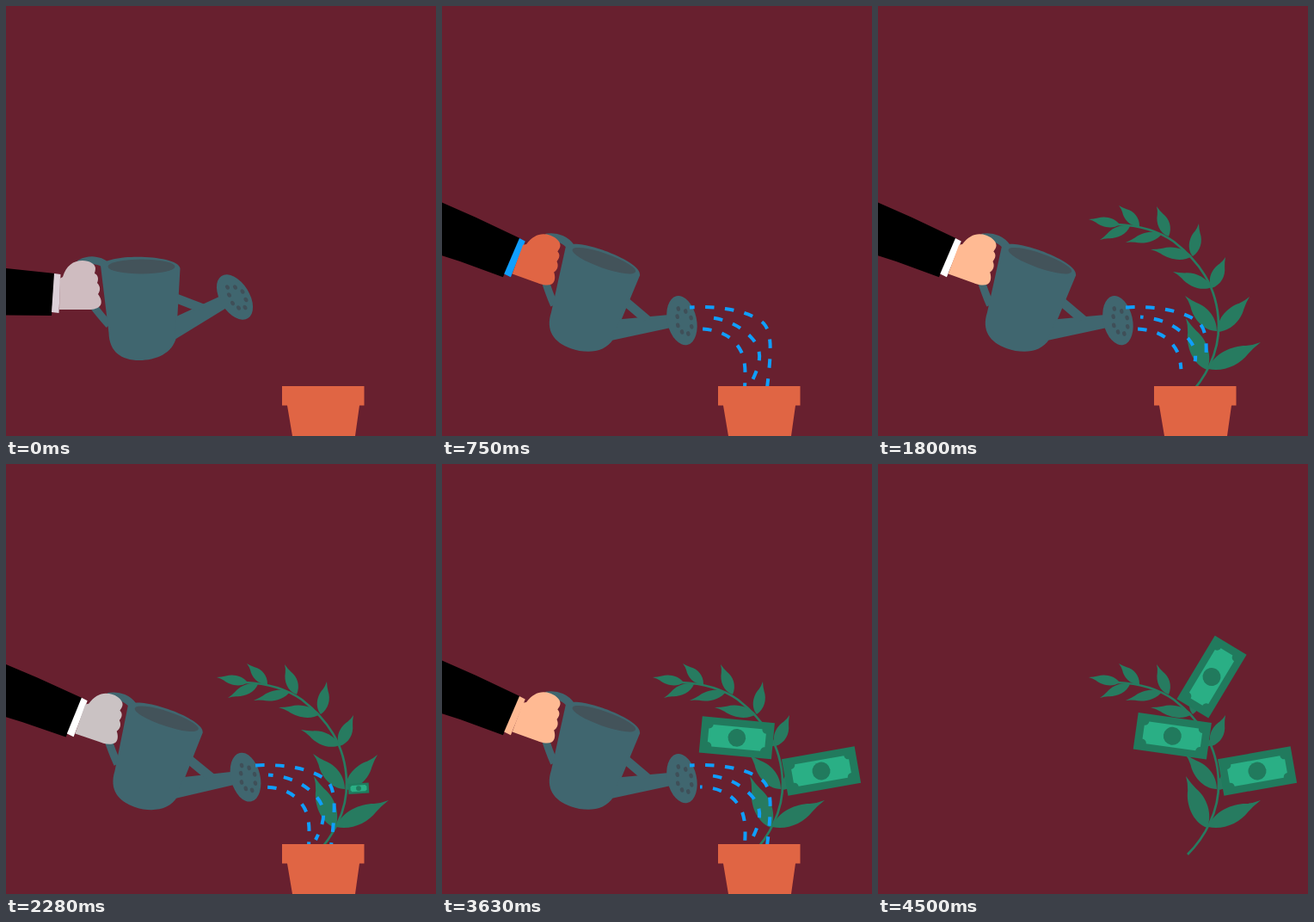
An HTML page that plays this animation: 500x500 px, repeating every 4.53 s.

```html
<!DOCTYPE html>
<html lang="en">
<head>
<meta charset="utf-8">
<title>Watering the money plant</title>
<style>
  html, body { margin: 0; width: 100%; height: 100%; overflow: hidden; background: #68202f; }
  svg { display: block; width: 100%; height: 100%; }
</style>
</head>
<body>
<svg viewBox="0 0 500 500">
  <defs>
    <g id="bill">
      <rect x="-43" y="-21.5" width="86" height="43" fill="#217a5d"/>
      <path fill="#2aaf85" d="M-29-13H29A5 5 0 0 0 34-8V8A5 5 0 0 0 29 13H-29A5 5 0 0 0-34 8V-8A5 5 0 0 0-29-13Z"/>
      <circle r="10.5" fill="#217a5d"/>
    </g>
  </defs>
  <rect width="500" height="500" fill="#68202f"/>
  <g id="plant" fill="#277b60">
    <path d="M360 454C379 435 397 405 396 370C395 325 372 296 344 274C324 260 302 255 278 254" fill="none" stroke="#277b60" stroke-width="2.7"/>
  </g>
  <g id="bills"></g>
  <g id="props">
    <g id="can">
      <path d="M116 301C108 295 97 294 87 299C82 320 90 338 120 371" fill="none" stroke="#40666f" stroke-width="9"/>
      <g fill="#40666f">
        <path d="M110 302C118 287 200 289 202.5 305L198 385C194 404 174 412 155 412C134 412 120 402 119.5 380Z"/>
        <path d="M198 361L250 337L258 350L196 388Z"/>
        <path d="M200 335L234 348L222 355L199 346Z"/>
        <ellipse cx="266" cy="338.5" rx="17" ry="29" transform="rotate(-32 266 338.5)"/>
      </g>
      <ellipse cx="157.5" cy="303" rx="39" ry="8.5" fill="#43535a"/>
      <g id="holes" fill="#3f4f58"></g>
      <path d="M-90 298L0 305L57 311L53 360L0 359.5L-90 362Z"/>
      <path id="cuff" d="M56 311L63.500 312L61.500 357L53 356Z"/>
      <path id="hand" d="M62.500 317L66 315C70 302 78 296 89 296C97 296 104 300 104 305C104 308 103 310 103 311C107 313 108 317 106 322C110 326 110 331 107 335C111 340 112 346 109 349C104 354 95 353 90 353L62 353Z"/>
    </g>
    <g id="water" fill="none" stroke="#0f9fff" stroke-width="4">
      <path d="M288 350.500C330 348 361 357 374 369C384 380 383 402 378 444"/>
      <path d="M305 361.500C327 363 346 370 361 387C373 401 371 415 360 437"/>
      <path d="M300 375.500C327 376 341 388 348 402C353 414 353 425 352 444"/>
    </g>
    <path d="M321 442H416.500V464.500H411L406 500H333L327 464.500H321Z" fill="#e06544"/>
  </g>
</svg>
<script>
const LOOP = 4530, CURTAIN = 4500, TILT = 19.4;
const DASH = 10.5, PERIOD = 23, FLOW = 0.1;
const $ = id => document.getElementById(id);

function add(parent, tag, attrs) {
  const el = document.createElementNS('http://www.w3.org/2000/svg', tag);
  for (const k in attrs) el.setAttribute(k, attrs[k]);
  return parent.appendChild(el);
}

// base x, base y, tip x, tip y, width
const leaves = [
  [383, 423, 358, 363, 20], [384, 422, 445, 391, 19], [394, 378, 357, 337, 17],
  [395, 379, 432, 338, 17], [388, 327, 343, 309, 14], [388, 328, 404, 292, 14],
  [365, 291, 317, 283, 13], [366, 291, 373, 253, 13], [330, 265, 288, 275, 11],
  [338, 268, 324, 233, 13], [293, 256, 258, 272, 11], [304, 256, 280, 232, 12],
  [281, 254, 245, 248, 11]
];
for (const [x, y, tx, ty, w] of leaves) {
  const n = Math.hypot(tx - x, ty - y);
  const p = (a, b) => `${(a * n).toFixed(1)} ${(b * w).toFixed(1)}`;
  add($('plant'), 'path', {
    d: `M0 0C${p(.2, -.7)} ${p(.55, -.6)} ${p(.75, -.22)}Q${p(.87, -.04)} ${p(1, 0)}` +
       `Q${p(.85, .1)} ${p(.72, .28)}C${p(.5, .65)} ${p(.2, .6)} 0 0Z`,
    transform: `translate(${x} ${y}) rotate(${Math.atan2(ty - y, tx - x) * 180 / Math.PI})`
  });
}

const holes = [[257.5, 327], [266.5, 327], [275, 332], [279, 341.5], [278, 350.5],
  [270.5, 351], [263.5, 345.5], [259.5, 336]];
for (const [x, y] of holes)
  add($('holes'), 'ellipse', { cx: x, cy: y, rx: 2.2, ry: 2.9, transform: `rotate(-32 ${x} ${y})` });

const bills = [
  { at: 2250, px: 397, py: 383, cx: 441, cy: 357, rot: -10, swing: 8 },
  { at: 3170, px: 386, py: 322, cx: 342.3, cy: 316.3, rot: 8, swing: -30 },
  { at: 3840, px: 366, py: 286, cx: 388, cy: 247.5, rot: -59, swing: 20 }
];
for (const b of bills) b.el = add($('bills'), 'use', { href: '#bill' });

// tilt: start, fully tipped, start back, upright; dash phases per stream at time ref
const pours = [
  { tilt: [0, 350, 1050, 1400], ref: 750, phase: [18, 11, 3] },
  { tilt: [1420, 1700, 2215, 2615], ref: 2280, phase: [2, 18, 4] },
  { tilt: [2840, 3190, 3950, 4350], ref: 3630, phase: [18, 10, 15] }
];
const streams = [...$('water').children].map(el => ({ el, len: el.getTotalLength() }));

// from time, skin, cuff
const tones = [
  [0, '#cfbcc0', '#dcd0d8'], [375, '#e06544', '#0f9fff'], [1080, '#ffba93', '#ffffff'],
  [1845, '#cac2c3', '#ffffff'], [2580, '#e06544', '#e06544'], [3255, '#ffba93', '#ffba93']
];

const ramp = (t, a, b) => Math.min(1, Math.max(0, (t - a) / (b - a)));
const quad = p => p < .5 ? 2 * p * p : 1 - 2 * (1 - p) ** 2;
const cubic = p => p < .5 ? 4 * p ** 3 : 1 - 4 * (1 - p) ** 3;

function drawStream(s, phase, from, to) {
  const marks = [0];
  const first = ((phase % PERIOD) + PERIOD) % PERIOD - PERIOD;
  let pos = 0;
  for (let x = first; x < to; x += PERIOD) {
    const a = Math.max(x, from), b = Math.min(x + DASH, to);
    if (b <= a) continue;
    marks.push(a - pos, b - a);
    pos = b;
  }
  const shown = marks.length > 1;
  s.el.style.display = shown ? '' : 'none';
  if (shown) s.el.setAttribute('stroke-dasharray', [...marks, 999].join(' '));
}

function drawCan(t) {
  const pour = pours.filter(p => t >= p.tilt[0]).pop();
  const [a, b, c, d] = pour.tilt;
  const angle = TILT * (quad(ramp(t, a, b)) - quad(ramp(t, c, d)));
  $('can').setAttribute('transform', `rotate(${angle} 193 390)`);
  const head = ramp(t, a + 200, b + 150), tail = ramp(t, c + 70, c + 320);
  streams.forEach((s, i) =>
    drawStream(s, pour.phase[i] + FLOW * (t - pour.ref), tail * s.len, head * s.len));
  const [, skin, cuff] = tones.filter(n => t >= n[0]).pop();
  $('hand').setAttribute('fill', skin);
  $('cuff').setAttribute('fill', cuff);
}

function drawBill(b, t) {
  const dt = t - b.at;
  b.el.style.display = dt > 0 ? '' : 'none';
  if (dt <= 0) return;
  const wave = dt < 520 ? Math.cos(.0125 * dt) : 0;
  const size = 1 - Math.exp(-.0085 * dt) * wave;
  const turn = b.swing * Math.exp(-.005 * dt) * wave;
  b.el.setAttribute('transform', `translate(${b.px} ${b.py}) rotate(${turn}) scale(${size}) ` +
    `translate(${b.cx - b.px} ${b.cy - b.py}) rotate(${b.rot})`);
}

function draw(t) {
  const grow = cubic(ramp(t, 780, 1620));
  $('plant').style.display = grow > 0 ? '' : 'none';
  $('plant').setAttribute('transform', `translate(360 454) scale(${grow}) translate(-360 -454)`);
  for (const b of bills) drawBill(b, t);
  $('props').style.display = t < CURTAIN ? '' : 'none';
  drawCan(t);
}

let start;
function tick(now) {
  if (start === undefined) start = now;
  draw((now - start) % LOOP);
  requestAnimationFrame(tick);
}
draw(0);
requestAnimationFrame(tick);
</script>
</body>
</html>
```
